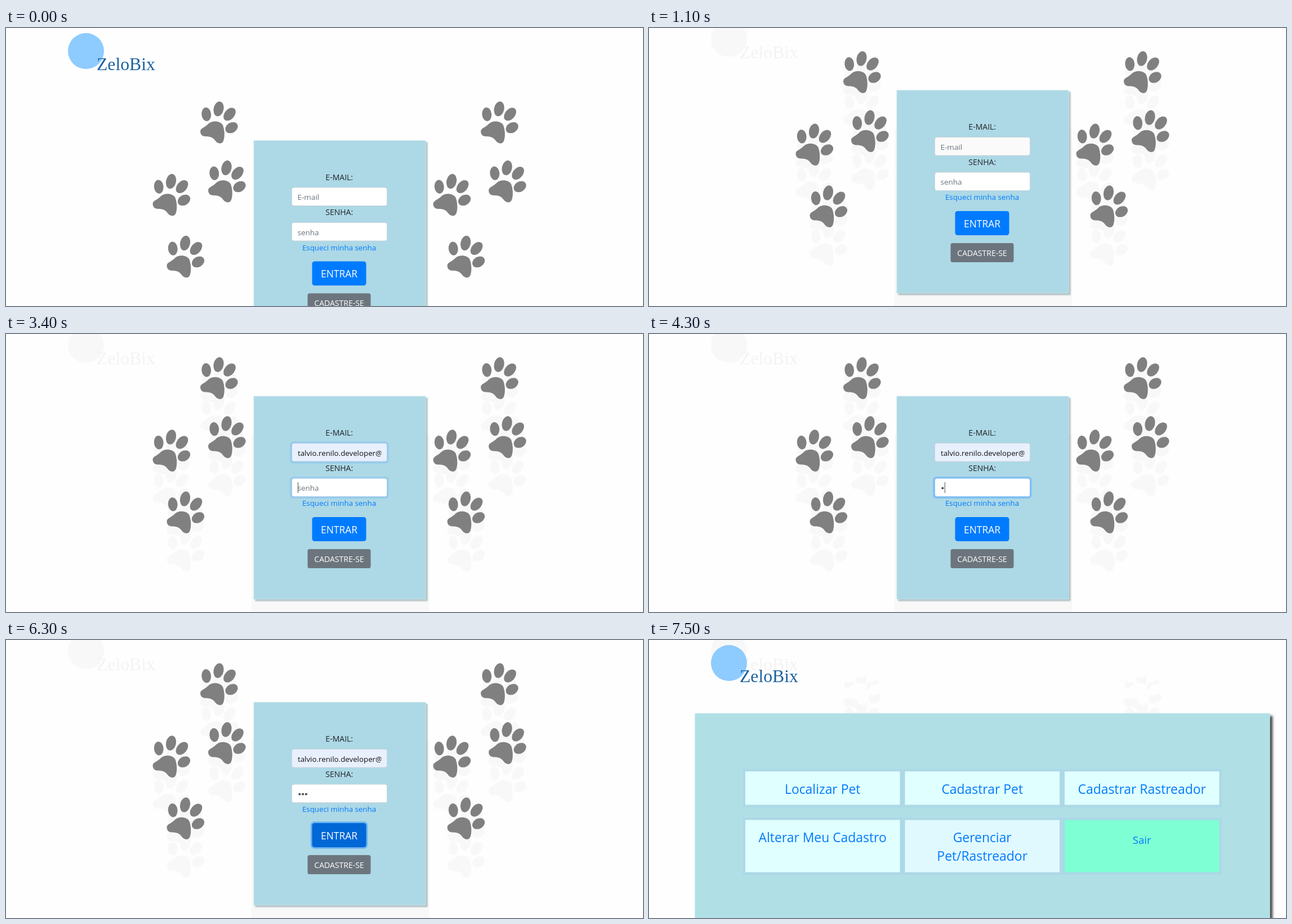
Recreate the animation shown at these times as an HTML page. Size 1131 px wide and 495 px high, loop 8 s.

```html
<!DOCTYPE html>
<html lang="pt-BR">
<head>
<meta charset="utf-8">
<title>Login</title>
<style>
  html, body { margin: 0; width: 100%; height: 100%; overflow: hidden; background: #fefefe; }
  svg { display: block; width: 1131px; height: 495px; }
  text { font-family: "Open Sans", "Noto Sans", sans-serif; white-space: pre; }
  .mid { text-anchor: middle; }
  .label { font-size: 14px; fill: #212529; }
  .hint { font-size: 13.5px; fill: #6c757d; }
  .typed { font-size: 13.3px; fill: #111; }
  .preview { font: 12px "Liberation Sans", Arial, sans-serif; fill: #111; }
  .brand { font: 31.7px "Liberation Serif", "Noto Serif", serif; }
  .menu { font-size: 22.9px; fill: #007bff; }
</style>
</head>
<body>
<svg viewBox="0 0 1131 495" xmlns="http://www.w3.org/2000/svg">
  <defs>
    <g id="paw">
      <ellipse cx="10.7" cy="22.7" rx="8.4" ry="12.2" transform="rotate(-5 10.7 22.7)"/>
      <ellipse cx="32.5" cy="13" rx="8.9" ry="13.3" transform="rotate(12 32.5 13)"/>
      <ellipse cx="52" cy="22.5" rx="8.8" ry="13.2" transform="rotate(40 52 22.5)"/>
      <ellipse cx="55.5" cy="46.5" rx="11.8" ry="9" transform="rotate(-32 55.5 46.5)"/>
      <path d="M0 53C0 47 9 46 15 39C21 33 36 34 40 42C43 50 44 62 41 70C38 77 30 75 26 69C22 63 16 62 9 62C3 62 0 58 0 53Z"/>
    </g>
    <g id="paws"></g>
    <g id="logo">
      <circle cx="142" cy="41" r="32"/>
    </g>
    <filter id="soft" x="-10%" y="-10%" width="120%" height="120%">
      <feDropShadow dx="3" dy="3" stdDeviation="1.2" flood-color="#7f959b" flood-opacity=".6"/>
    </filter>
    <filter id="hard" x="-10%" y="-10%" width="120%" height="120%">
      <feDropShadow dx="4.5" dy="4.5" stdDeviation="2.2" flood-color="#000" flood-opacity=".75"/>
    </filter>
    <filter id="pop" x="-10%" y="-20%" width="120%" height="150%">
      <feDropShadow dx="0" dy="1" stdDeviation="1.2" flood-color="#000" flood-opacity=".45"/>
    </filter>
    <clipPath id="field"><rect x="517" y="284" width="149.5" height="34"/></clipPath>
  </defs>

  <rect width="1131" height="495" fill="#fefefe"/>

  <g id="trail" fill="#f8f8f8">
    <g transform="translate(0 -21.5)">
      <use href="#logo"/>
      <text class="brand" x="161" y="75" fill="#f3f3f3">ZeloBix</text>
      <use href="#paws"/>
      <rect x="436" y="200" width="315" height="362"/>
    </g>
    <g id="late">
      <use href="#paws" y="-74"/>
      <use href="#paws" y="-89.5" fill="#fefefe"/>
    </g>
  </g>

  <g id="login">
    <use href="#paws" fill="#808080"/>
    <rect x="440" y="200.5" width="305" height="361" fill="#add8e6" stroke="#c4e3ec" filter="url(#soft)"/>
    <text class="label mid" x="591.7" y="270.5">E-MAIL:</text>
    <rect id="mailRing" x="504" y="281" width="175.5" height="39" rx="6" fill="#007bff"/>
    <rect id="mailBox" x="507.5" y="284" width="169" height="32.5" rx="3.6"/>
    <text id="mailHint" class="hint" x="517.5" y="306">E-mail</text>
    <g clip-path="url(#field)">
      <text id="mailPreview" class="preview" x="518" y="306.5"></text>
      <text id="mailTyped" class="typed" x="518" y="306"></text>
    </g>
    <rect id="mailCaret" x="518" y="291" width="1" height="19" fill="#000"/>

    <text class="label mid" x="591.7" y="333">SENHA:</text>
    <rect id="passRing" x="504" y="343.5" width="175.5" height="39" rx="6" fill="#007bff"/>
    <rect id="passBox" x="507.5" y="346.5" width="169" height="32.5" rx="3.6" fill="#fff"/>
    <text id="passHint" class="hint" x="517.5" y="368.5">senha</text>
    <g id="dots" fill="#495057">
      <circle cx="521.3" cy="364" r="2.1"/>
      <circle cx="527.1" cy="364" r="2.1"/>
      <circle cx="532.9" cy="364" r="2.1"/>
    </g>
    <rect id="passCaret" y="353.5" width="1" height="19" fill="#495057"/>

    <text id="link" class="mid" x="591.5" y="395.5" font-size="13.3">Esqueci minha senha</text>
    <rect id="enterRing" x="540.8" y="412.8" width="101.4" height="48.4" rx="7" fill="#268fff"/>
    <rect id="enter" x="543.5" y="415.5" width="96" height="43" rx="4.5"/>
    <text class="mid" x="591.5" y="444.3" font-size="17.4" fill="#fff">ENTRAR</text>
    <rect x="535.5" y="472.5" width="112" height="34" rx="3.6" fill="#6c757d"/>
    <text class="mid" x="591.5" y="495" font-size="14" fill="#fff">CADASTRE-SE</text>

    <g id="list">
      <rect x="506" y="318" width="215" height="46.5" rx="4" fill="#fff" filter="url(#pop)"/>
      <rect id="row" x="506" y="325" width="215" height="32.5" fill="#c8c8c8"/>
      <text id="option" x="517" y="345.5" font-size="11.6" fill="#222"></text>
    </g>
  </g>

  <g id="home">
    <rect x="81.5" y="130.5" width="1021" height="420" fill="#b0e0e6" filter="url(#hard)"/>
    <g id="tiles"></g>
  </g>

  <g id="head">
    <use href="#logo" fill="#8ecbff"/>
    <text class="brand" x="161" y="75" fill="#1a62a0">ZeloBix</text>
  </g>
</svg>
<script>
  const LOOP = 8000, STEP = 100, MAIL = "talvio.renilo.developer@mail.test";
  const $ = id => document.getElementById(id);
  const set = (id, name, value) => $(id).setAttribute(name, value);
  const show = (id, on) => set(id, "visibility", on ? "visible" : "hidden");
  const within = (t, a, b) => t >= a && t < b;
  const fade = (t, start) => Math.max(0, Math.min(1, (t - start + STEP) / (2 * STEP)));
  const mix = (a, b, k) => `rgb(${a.map((v, i) => Math.round(v + (b[i] - v) * k))})`;

  function add(parent, tag, attrs, text = "") {
    const el = document.createElementNS("http://www.w3.org/2000/svg", tag);
    for (const key in attrs) el.setAttribute(key, attrs[key]);
    el.textContent = text;
    return $(parent).appendChild(el);
  }

  for (const dx of [0, 498])
    for (const [x, y] of [[345, 131], [359, 236], [260.5, 260], [285.5, 370]])
      add("paws", "use", { href: "#paw", x: x + dx, y });

  for (const id of ["mailPreview", "mailTyped", "option"]) $(id).textContent = MAIL;

  const rows = [
    { y: 234, h: 59.5, names: ["Localizar Pet", "Cadastrar Pet", "Cadastrar Rastreador"] },
    { y: 320.5, h: 93, names: ["Alterar Meu Cadastro", "Gerenciar\nPet/Rastreador", "Sair"] }
  ];
  const tiles = {};
  for (const { y, h, names } of rows) {
    add("tiles", "rect", { x: 166.5, y: y - 4.5, width: 851, height: h + 9, fill: "#add8e6" });
    names.forEach((name, i) => {
      const x = 171 + i * 283.5, small = name === "Sair";
      tiles[name] = add("tiles", "rect", { x, y, width: 274.5, height: h, fill: "#e0ffff" });
      name.split("\n").forEach((line, n) => add("tiles", "text", {
        class: "menu mid", x: x + 137.2, y: y + (small ? 42.5 : 39.5) + n * 33,
        style: small ? "font-size:18.6px" : ""
      }, line));
    });
  }

  function scrollAt(t) {
    if (t < 900) return 0;
    if (t < 1000) return 21.5;
    return t < 1100 ? 74 : 89.5;
  }

  function field(name, focus) {
    set(name + "Ring", "opacity", 0.25 * focus);
    set(name + "Box", "stroke", mix([206, 212, 218], [128, 189, 255], focus));
  }

  function drawLogin(t) {
    const previewing = within(t, 2500, 2800), filled = t >= 2500;
    field("mail", fade(t, 1900) - fade(t, 3400));
    set("mailBox", "fill", filled ? "#e8f0fe" : within(t, 1100, 1900) ? "#fafafa" : "#fff");
    show("mailHint", !filled);
    show("mailPreview", previewing);
    show("mailTyped", t >= 2800);
    show("mailCaret", within(t, 1900, 2800));
    show("list", within(t, 2000, 2800));
    show("row", within(t, 2400, 2800));

    const typed = [4300, 4500, 4600].filter(at => t >= at).length;
    field("pass", fade(t, 3400) - fade(t, 6200));
    show("passHint", !typed);
    [...$("dots").children].forEach((dot, i) =>
      dot.setAttribute("visibility", i < typed ? "visible" : "hidden"));
    set("passCaret", "x", typed ? 519 + typed * 5.8 : 518);
    show("passCaret", within(t, 3400, 3800) || within(t, 4300, 5100) || within(t, 5600, 6100));

    const over = within(t, 5400, 5500);
    set("link", "fill", over ? "#0056b3" : "#007bff");
    set("link", "text-decoration", over ? "underline" : "none");
    set("enter", "fill", mix([0, 123, 255], [0, 103, 214], fade(t, 6000)));
    set("enterRing", "opacity", 0.5 * fade(t, 6200));
  }

  function draw(time) {
    const t = Math.floor(time / STEP) * STEP, home = t >= 6400, scroll = home ? 0 : scrollAt(t);
    set("login", "transform", `translate(0 ${-scroll})`);
    set("head", "transform", `translate(0 ${-scroll})`);
    show("trail", t >= 1000);
    show("late", t >= 1100);
    $("login").style.display = home ? "none" : "";
    $("home").style.display = home ? "" : "none";
    if (!home) return drawLogin(t);
    tiles["Gerenciar\nPet/Rastreador"].setAttribute("fill",
      within(t, 7300, 7400) ? "#7fffd4" : t >= 7400 ? "#e0f9ff" : "#e0ffff");
    tiles.Sair.setAttribute("fill", t >= 7500 ? "#7fffd4" : "#e0ffff");
  }

  const start = performance.now();
  function tick() {
    draw((performance.now() - start) % LOOP);
    requestAnimationFrame(tick);
  }
  tick();
</script>
</body>
</html>
```
